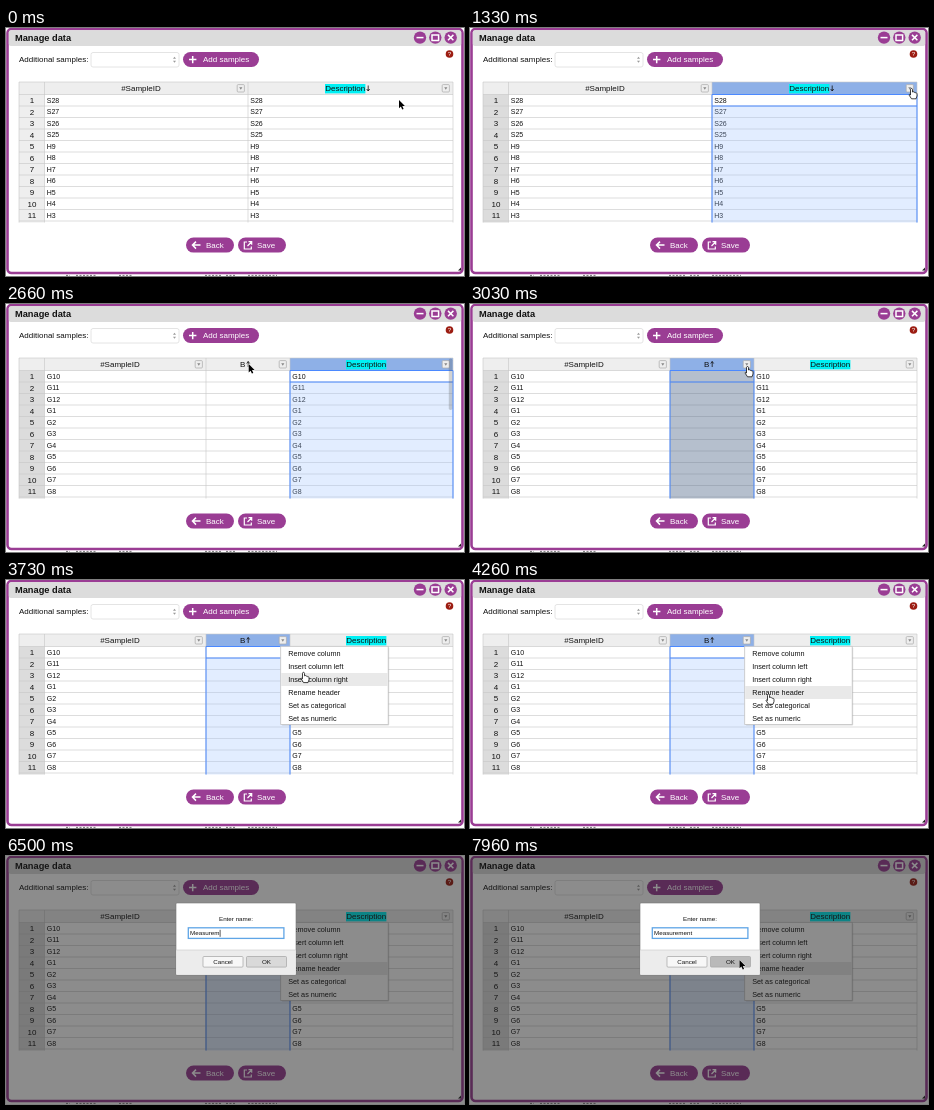
Animation of 458x248 px, one loop 8000 ms. Source, as an HTML page:

```html
<!DOCTYPE html>
<html lang="en">
<head>
<meta charset="utf-8">
<title>Manage data</title>
<style>
html, body { margin: 0; width: 100%; height: 100%; overflow: hidden; background: #fff; }
svg { display: block; width: 100vw; height: 100vh; font: 8px "Liberation Sans", Arial, sans-serif; }
.mid { text-anchor: middle; }
.cell { font-size: 7px; }
.item { font-size: 7.25px; }
.small { font-size: 6.25px; }
.title { font-size: 9.25px; font-weight: bold; }
.light { fill: none; stroke: #fff; stroke-width: 1.5; }
.grid { fill: none; stroke: #c6c6c6; stroke-width: .6; }
.outline { fill: none; stroke: #4b89ff; stroke-width: 1; }
</style>
</head>
<body>
<svg id="stage" viewBox="0 0 458 248" preserveAspectRatio="none"></svg>
<script>
const LOOP = 8000, PURPLE = '#9a3d94';
const TOP = 54, BODY = 66.5, ROW = 11.5, BOTTOM = 194.5, LEFT = 13, RIGHT = 447;
const stage = document.getElementById('stage');

const rect = (x, y, w, h, fill, more = '') =>
  `<rect x="${x}" y="${y}" width="${w}" height="${h}" fill="${fill}" ${more}/>`;
const text = (x, y, value, cls = '', fill = '#111') =>
  `<text x="${x}" y="${y}" class="${cls}" fill="${fill}">${value}</text>`;
const path = (d, cls = '', more = '') => `<path d="${d}" class="${cls}" ${more}/>`;
const group = (id, body, more = '') => `<g id="${id}" ${more}>${body}</g>`;
const pill = (x, y, w, label, labelX) =>
  rect(x, y, w, 15, PURPLE, 'rx="7.5"') + text(labelX, y + 10.4, label, '', '#fff');
const disc = (x, symbol) =>
  `<circle cx="${x}" cy="9.6" r="6.2" fill="${PURPLE}"/>` + path(symbol, 'light');

function windowFrame() {
  const remnants = [[60, 4], [70, 20], [113, 14], [199, 17], [220, 10], [242, 29]];
  return rect(0, 0, 458, 248, '#fff')
    + remnants.map(([x, w]) => path(`M${x} 247.4h${w}`, '', 'stroke="#777" stroke-dasharray="2 1.5"')).join('')
    + rect(1.5, 1, 455, 244, '#fff', `rx="4" stroke="${PURPLE}" stroke-width="2.6"`)
    + rect(2.8, 2.2, 452.4, 15.8, '#dcdcdc', 'rx="2"')
    + text(9, 12.9, 'Manage data', 'title')
    + disc(414, 'M410.5 9.6h7')
    + disc(429.3, 'M426 7h6.6v5.4h-6.6z')
    + disc(444.7, 'M442 6.9l5.4 5.4m0-5.4l-5.4 5.4')
    + '<circle cx="443.5" cy="26" r="3.8" fill="#9c1d12"/>' + text(443.5, 28.3, '?', 'small mid', '#fff')
    + text(13, 34.4, 'Additional samples:')
    + rect(85, 24.5, 88, 14.5, '#fff', 'rx="2" stroke="#ddd" stroke-width=".8"')
    + path('M167 30.8l1.5-2 1.5 2zM167 32.8l1.5 2 1.5-2z', '', 'fill="#999"')
    + pill(177, 24, 76, 'Add samples', 197) + path('M183 31.6h7.4M186.7 28v7.3', 'light')
    + pill(180, 209.6, 48, 'Back', 200) + path('M194.5 217.1h-8m3.5-3.5l-3.5 3.5 3.5 3.5', 'light')
    + pill(232, 209.6, 48, 'Save', 251)
    + path('M241 214h-2.7v7h7v-2.4M241.5 218l4-4m-3-.4h3.2v3.2', 'light', 'style="stroke-width:1.2"')
    + path('M452 242.5h3v-3z', '', 'fill="#222"');
}

function table({ edges, names, ids, sort, up, selected, pressed }) {
  const active = selected !== undefined;
  const last = names.length - 1;
  let out = rect(LEFT, TOP, RIGHT - LEFT, BODY - TOP, '#eee')
    + rect(LEFT, BODY, edges[0] - LEFT, BOTTOM - BODY, active ? '#dcdcdc' : '#eee');
  if (active) out += rect(edges[selected], TOP, edges[selected + 1] - edges[selected], BODY - TOP, '#8eb0e7');

  let lines = `M${LEFT} ${TOP}H${RIGHT}M${LEFT} ${TOP}V${BOTTOM}`;
  for (let i = 0; i <= ids.length; i++) lines += `M${LEFT} ${BODY + i * ROW}H${RIGHT}`;
  edges.forEach(x => lines += `M${x} ${TOP}V${BOTTOM}`);
  out += path(lines, 'grid');

  names.forEach((name, i) => {
    const end = edges[i + 1], center = (edges[i] + end) / 2 - 5.3;
    if (name === 'Description') out += rect(center - 20.2, 56, 40.4, 9.4, '#00f0f4');
    out += text(center, 63.2, name, 'mid')
      + rect(end - 10.8, 56.6, 7.2, 7.4, '#eee', 'rx="1" stroke="#aaa" stroke-width=".7"')
      + path(`M${end - 8.8} 59.3h3.2l-1.6 2.4z`, '', 'fill="#888"');
    if (i === sort) {
      const x = center + (name === 'B' ? 5.5 : 23);
      const head = up ? 'M-1.5 59.5L0 57.5 1.5 59.5' : 'M-1.5 61L0 63 1.5 61';
      out += path('M0 57.5V63' + head, '',
        `transform="translate(${x})" fill="none" stroke="#111" stroke-width=".8"`);
    }
  });

  ids.forEach((id, i) => {
    const y = BODY + i * ROW;
    out += text(26, y + 8.5, i + 1, 'mid')
      + text(edges[0] + 2.3, y + 8.2, id, 'cell') + text(edges[last] + 2.3, y + 8.2, id, 'cell');
  });

  if (active) {
    const x = edges[selected], w = edges[selected + 1] - x;
    out += pressed
      ? rect(x, BODY, w, BOTTOM - BODY, 'rgba(70,95,130,.4)')
      : rect(x, BODY + ROW, w, BOTTOM - BODY - ROW, 'rgba(160,196,255,.3)');
    out += path(`M${x} ${BOTTOM}V${BODY}H${x + w}V${BOTTOM}M${x} ${BODY + ROW}h${w}`, 'outline');
  }
  return out;
}

const series = (letter, numbers) => numbers.map(n => letter + n);
const descending = [...series('S', [28, 27, 26, 25]), ...series('H', [9, 8, 7, 6, 5, 4, 3])];
const ascending = series('G', [10, 11, 12, 1, 2, 3, 4, 5, 6, 7, 8]);
const pair = { edges: [38.5, 242, RIGHT], names: ['#SampleID', 'Description'], ids: descending, sort: 1 };
const inserted = { edges: [38.5, 173.5, 310, RIGHT], names: ['#SampleID', 'B', 'Description'], ids: descending, sort: 1 };
const sorted = { ...inserted, edges: [38.5, 200, 284, RIGHT], ids: ascending, up: true };

const scenes = [
  [0, pair],
  [1230, { ...pair, selected: 1, pressed: true }],
  [1330, { ...pair, selected: 1 }],
  [1930, { ...inserted, selected: 2 }],
  [2560, { ...sorted, selected: 2 }],
  [2960, { ...sorted, selected: 1, pressed: true }],
  [3130, { ...sorted, selected: 1 }]
];

const options = ['Remove column', 'Insert column left', 'Insert column right',
  'Rename header', 'Set as categorical', 'Set as numeric'];
const MENU_TOP = 67, ITEM = 13;
const menu = rect(1, 67.5, 107.5, 78, 'rgba(0,0,0,.15)', 'rx="1"')
  + rect(0, 66.3, 107.5, 78.2, '#fff', 'stroke="#c4c4c4" stroke-width=".8"')
  + rect(.5, 0, 106.5, ITEM, '#e9e9e9', 'id="hover"')
  + options.map((label, i) => text(7.5, MENU_TOP + i * ITEM + 9.1, label, 'item')).join('');

const button = (x, label, id) =>
  rect(x, 100.5, 40, 10.6, '#f7f7f7', `id="${id}" stroke="#a4a4a4" stroke-width=".7" rx="1"`)
  + text(x + 20, 108.1, label, 'small mid');
const dialog = rect(0, 0, 458, 248, 'rgba(26,26,26,.5)')
  + rect(170, 47, 120, 72, '#fff', 'rx="1" stroke="#777" stroke-width=".6"')
  + rect(170.3, 94, 119.4, 24.7, '#ececec') + path('M170 94h120', 'grid')
  + text(230, 65.4, 'Enter name:', 'small mid')
  + rect(182.3, 71.8, 95.6, 10.6, '#fff', 'stroke="#5fa5e6" stroke-width="1.3"')
  + text(184, 79.3, '', 'small').replace('<text', '<text id="entry"')
  + rect(0, 73.8, .7, 7, '#111', 'id="caret"')
  + button(197, 'Cancel', 'cancel') + button(240.5, 'OK', 'ok');

const arrow = path('M0 0V8.3L1.9 6.6 3.2 9.5 4.6 8.9 3.3 6H5.9Z', '',
  'fill="#000" stroke="#fff" stroke-width=".7" paint-order="stroke"');
const hand = path('M1 .5C1.9.5 2 1.2 2 2V4C3 3.5 3.6 3.8 3.8 4.4 4.6 4 5 4.5 5.2 5 6 4.7 6.5 5.2 6.5 6V8L5.5 10.8H1L-1.3 7.2C-1.6 6.3-.6 6 0 7V2C0 1 .2.5 1 .5Z',
  '', 'fill="#fff" stroke="#111" stroke-width=".8"');

stage.innerHTML = windowFrame()
  + scenes.map(([, state], i) => group('scene' + i, table(state))).join('')
  + rect(442.8, 54.5, 3.6, 51.5, '#555', 'id="scrollbar" rx="1.8"')
  + group('menu', menu) + group('dialog', dialog)
  + group('arrow', arrow) + group('hand', hand);

const part = Object.fromEntries([...stage.querySelectorAll('[id]')].map(el => [el.id, el]));
const show = (id, on) => part[id].setAttribute('display', on ? 'inline' : 'none');
const within = (t, a, b) => t >= a && t < b;

// Pointer stops: time, x, y
const route = [
  [0, 393, 72], [60, 393, 72], [360, 426, 73], [630, 426, 73], [780, 433, 75], [1000, 440.5, 60],
  [1600, 440.5, 60], [1900, 421, 84], [2100, 421, 84], [2130, 419.5, 72], [2480, 241, 60],
  [2620, 241, 60], [2930, 276.5, 62], [3430, 276.5, 62], [3730, 296.5, 91.8], [4230, 297.5, 112.7],
  [4260, 297.5, 113.5], [7360, 297.5, 113.5], [7560, 315, 131], [7900, 270, 105], [7960, 269.5, 104], [LOOP, 269.5, 104]
];
const keys = [5230, 5530, 5830, 5960, 6130, 6230, 6360, 6500, 6600, 6730, 6860];

function pointerAt(t) {
  const i = Math.max(1, route.findIndex(stop => stop[0] > t));
  const [t0, x0, y0] = route[i - 1], [t1, x1, y1] = route[i];
  const p = (t - t0) / (t1 - t0), k = p * p * (3 - 2 * p);
  return [x0 + (x1 - x0) * k, y0 + (y1 - y0) * k];
}

function draw(t) {
  const current = scenes.filter(([start]) => start <= t).length - 1;
  scenes.forEach((_, i) => show('scene' + i, i === current));

  const [x, y] = pointerAt(t);
  const isHand = within(t, 930, 1930) || within(t, 2450, 2640) || within(t, 2880, 5330);
  show('hand', isHand);
  show('arrow', !isHand && !within(t, 5330, 7360));
  for (const id of ['hand', 'arrow']) part[id].setAttribute('transform', `translate(${x} ${y})`);

  show('scrollbar', within(t, 1930, 2750));
  part.scrollbar.setAttribute('opacity', .75 * Math.min(1, Math.max(0, (2750 - t) / 250)));

  const first = within(t, 1400, 1930);
  show('menu', first || t >= 3130);
  part.menu.setAttribute('transform', `translate(${first ? 330.5 : 274.7})`);
  const item = t >= 4260 ? 3 : Math.floor((y + 1.5 - MENU_TOP) / ITEM);
  show('hover', item >= 0);
  part.hover.setAttribute('y', MENU_TOP + item * ITEM);

  show('dialog', t >= 4660);
  if (t >= 4660) {
    part.entry.textContent = 'Measurement'.slice(0, keys.filter(k => k <= t).length);
    part.caret.setAttribute('x', 184.2 + part.entry.getComputedTextLength());
    show('caret', !within(t, 4960, 5230) && !within(t, 7030, 7360) && t < 7860);
    part.ok.setAttribute('fill', t >= 7930 ? '#b9b9b9' : '#d9d9d9');
  }
}

const began = performance.now();
function tick() {
  draw((performance.now() - began) % LOOP);
  requestAnimationFrame(tick);
}
tick();
</script>
</body>
</html>
```
